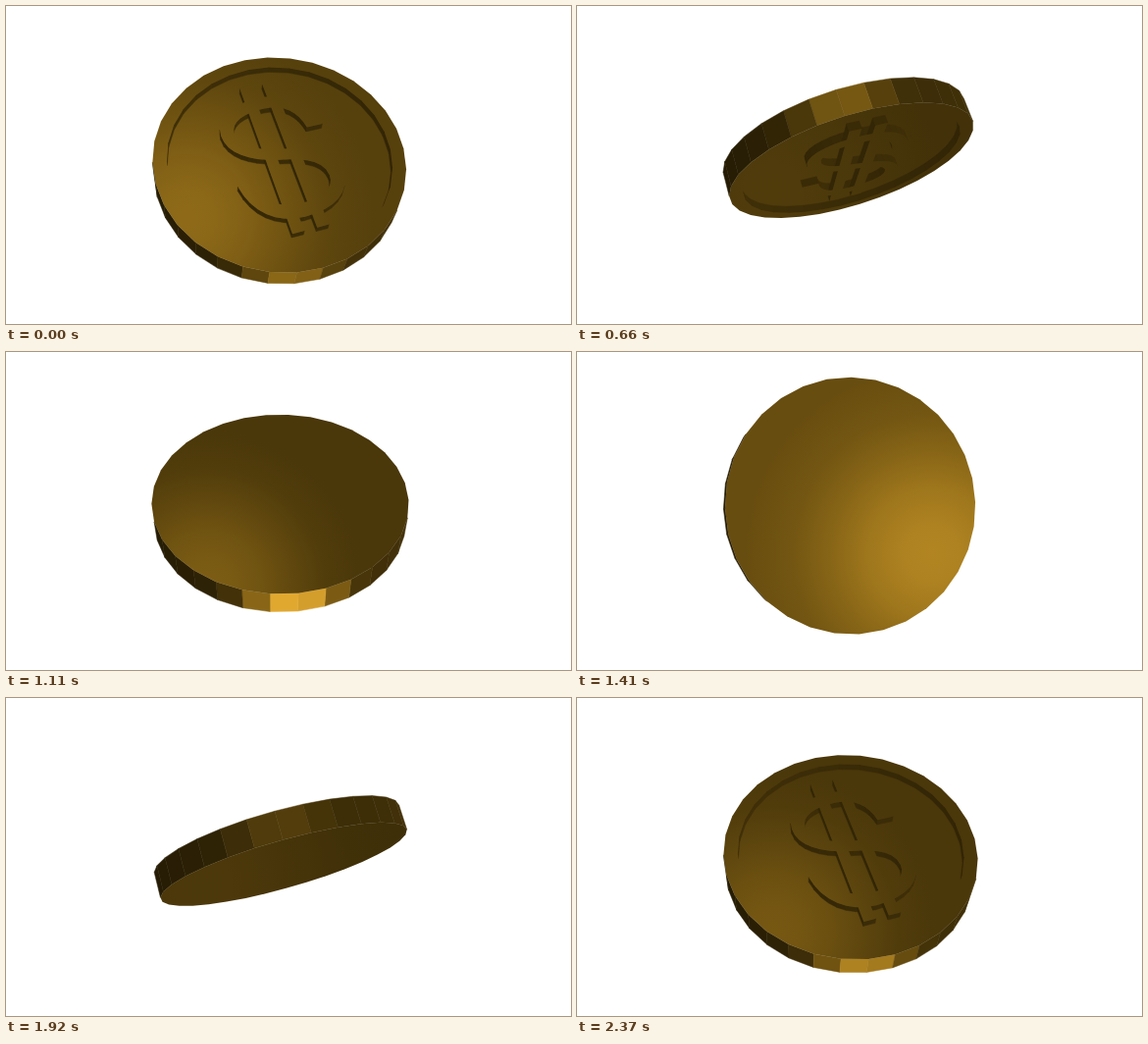
These frames come from a looping animation (576x324 px, 2400 ms). An HTML page with a canvas:

```html
<!DOCTYPE html>
<html lang="en">
<head>
<meta charset="utf-8">
<title>Spinning coin</title>
<style>
html, body { margin: 0; width: 100%; height: 100%; overflow: hidden; background: #fff; }
canvas { display: block; width: 576px; height: 324px; }
</style>
</head>
<body>
<canvas id="stage" width="576" height="324"></canvas>
<script>
const ctx = document.getElementById('stage').getContext('2d');
const LOOP = 2400, STEP = 30;
const CX = 279.5, CY = 156.6, CAMERA = 750;
const RADIUS = 128, HOLE = 114, SIDES = 32;
const FRONT = 8.35, BACK = -17.65, FLOOR = 0.35;

const cross = (a, b) => [a[1] * b[2] - a[2] * b[1], a[2] * b[0] - a[0] * b[2], a[0] * b[1] - a[1] * b[0]];
const dot = (a, b) => a[0] * b[0] + a[1] * b[1] + a[2] * b[2];
const unit = v => v.map(c => c / Math.hypot(...v));
const lerp = (a, b, k) => a + (b - a) * k;

// The coin turns about its own x axis, which is fixed in view space.
const axis = unit([0.949, 0.219, -0.228]);
const up = unit(cross(axis, cross([0, 0.72, 0.69], axis)));
const side = cross(axis, up);

// Face light over half a turn: time, centre x, centre y, reach, bright, dark
const light = [
  [0, 185, 215, 190, 142, 86],
  [210, 362, 205, 190, 178, 104],
  [360, 258, 262, 210, 214, 122],
  [660, 200, 190, 200, 80, 66],
  [795, 200, 190, 200, 72, 60],
  [805, 250, 200, 200, 70, 50],
  [1110, 205, 238, 160, 125, 74],
  [1170, 200, 238, 170, 118, 74],
  [1200, 185, 215, 190, 142, 86]
];

const gold = l => `rgb(${Math.round(l)},${Math.round(l * 0.745)},${Math.round(l * 0.1 + l * l * 0.0005)})`;

function ring(r) {
  return Array.from({ length: SIDES }, (_, i) => {
    const a = i * 2 * Math.PI / SIDES;
    return [r * Math.cos(a), r * Math.sin(a)];
  });
}

// Half of the S as cubic curves; the other half is the same turned by 180 degrees.
function letterS() {
  const curves = [
    [48, 56, 28, 74, 0, 74],
    [-32, 74, -53, 58, -53, 37],
    [-53, 14, -32, 1, -8, -5],
    [12, -9, 39, -14, 39, -36],
    [39, -51, 22, -59, 0, -59],
    [-22, -59, -33, -46, -36, -25]
  ];
  const half = [[53, 25]];
  let [x, y] = half[0];
  for (const [ax, ay, bx, by, ex, ey] of curves) {
    for (let i = 1; i <= 8; i++) {
      const t = i / 8, u = 1 - t;
      const mix = (p, a, b, e) => u * u * u * p + 3 * u * u * t * a + 3 * u * t * t * b + t * t * t * e;
      half.push([mix(x, ax, bx, ex), mix(y, ay, by, ey)]);
    }
    [x, y] = [ex, ey];
  }
  return [...half, ...half.map(([px, py]) => [-px, -py])].map(([px, py]) => [px + 1, py + 1]);
}

const bar = (l, r) => [[l, 91], [l, -87], [r, -87], [r, 91]];
const rim = ring(RADIUS);
const hole = ring(HOLE);
const holeInside = [...hole].reverse();
const sign = [letterS(), bar(-16.5, -4.5), bar(8.5, 20.5)];

function pose(t) {
  const a = (t * 0.15 + 14.5) * Math.PI / 180;
  const z = up.map((c, i) => c * Math.cos(a) + side[i] * Math.sin(a));
  const y = cross(z, axis);
  const turn = (px, py, pz) => axis.map((c, i) => c * px + y[i] * py + z[i] * pz);
  const project = (p, pz) => {
    const v = turn(p[0], p[1], pz);
    const s = CAMERA / (CAMERA - v[2]);
    return [CX + v[0] * s, CY - v[1] * s];
  };
  return { turn, project };
}

function area(pts) {
  return pts.reduce((sum, p, i) => {
    const q = pts[(i + 1) % pts.length];
    return sum + p[0] * q[1] - q[0] * p[1];
  }, 0);
}

function trace(pts) {
  ctx.beginPath();
  pts.forEach(p => ctx.lineTo(p[0], p[1]));
  ctx.closePath();
}

function fill(pts, paint, seam) {
  trace(pts);
  ctx.fillStyle = paint;
  ctx.fill();
  if (seam) {
    ctx.strokeStyle = paint;
    ctx.lineWidth = 0.5;
    ctx.stroke();
  }
}

function walls(shape, top, bottom, view, shade) {
  shape.forEach((p, i) => {
    const q = shape[(i + 1) % shape.length];
    const quad = [view.project(p, top), view.project(q, top), view.project(q, bottom), view.project(p, bottom)];
    if (area(quad) <= 0) return;
    const normal = unit(view.turn(q[1] - p[1], p[0] - q[0], 0));
    fill(quad, gold(shade(normal)), true);
  });
}

const low = unit([0.1, -0.67, 0.73]);
const high = unit([-0.1, 0.5, 0.86]);
const glint = (n, l) => Math.pow(Math.max(0, dot(n, l)), 20);
const rimShade = n => 52 + 15 * n[0] + 185 * glint(n, low) + 95 * glint(n, high);
const wallShade = n => 57 + 7 * n[0];

function facePaint(t) {
  const p = t % 1200;
  const i = light.findIndex((row, k) => k > 0 && p <= row[0]);
  const a = light[i - 1], b = light[i];
  const k = (p - a[0]) / (b[0] - a[0]);
  const [, x, y, r, bright, dark] = a.map((v, j) => lerp(v, b[j], k));
  const paint = ctx.createRadialGradient(x, y, 0, x, y, r);
  [0, 0.15, 0.35, 0.55, 0.75, 1].forEach(s => {
    const fall = (1 + Math.cos(Math.PI * s)) / 2;
    paint.addColorStop(s, gold(lerp(dark, bright, fall)));
  });
  return paint;
}

function draw(t) {
  const view = pose(t);
  const at = (shape, z) => shape.map(p => view.project(p, z));
  const paint = facePaint(t);
  ctx.fillStyle = '#fff';
  ctx.fillRect(0, 0, 576, 324);
  walls(rim, FRONT, BACK, view, rimShade);

  const face = at(rim, FRONT);
  if (area(face) >= 0) {
    fill(at(rim, BACK), paint);
    return;
  }
  fill(face, paint);
  ctx.save();
  trace(at(hole, FRONT));
  ctx.clip();
  walls(holeInside, FRONT, FLOOR, view, wallShade);
  sign.forEach(s => walls(s, FRONT, FLOOR, view, wallShade));
  sign.forEach(s => fill(at(s, FRONT), paint));
  ctx.restore();
}

const start = performance.now();
function tick() {
  const t = (performance.now() - start) % LOOP;
  draw(Math.floor(t / STEP) * STEP);
  requestAnimationFrame(tick);
}
tick();
</script>
</body>
</html>
```
